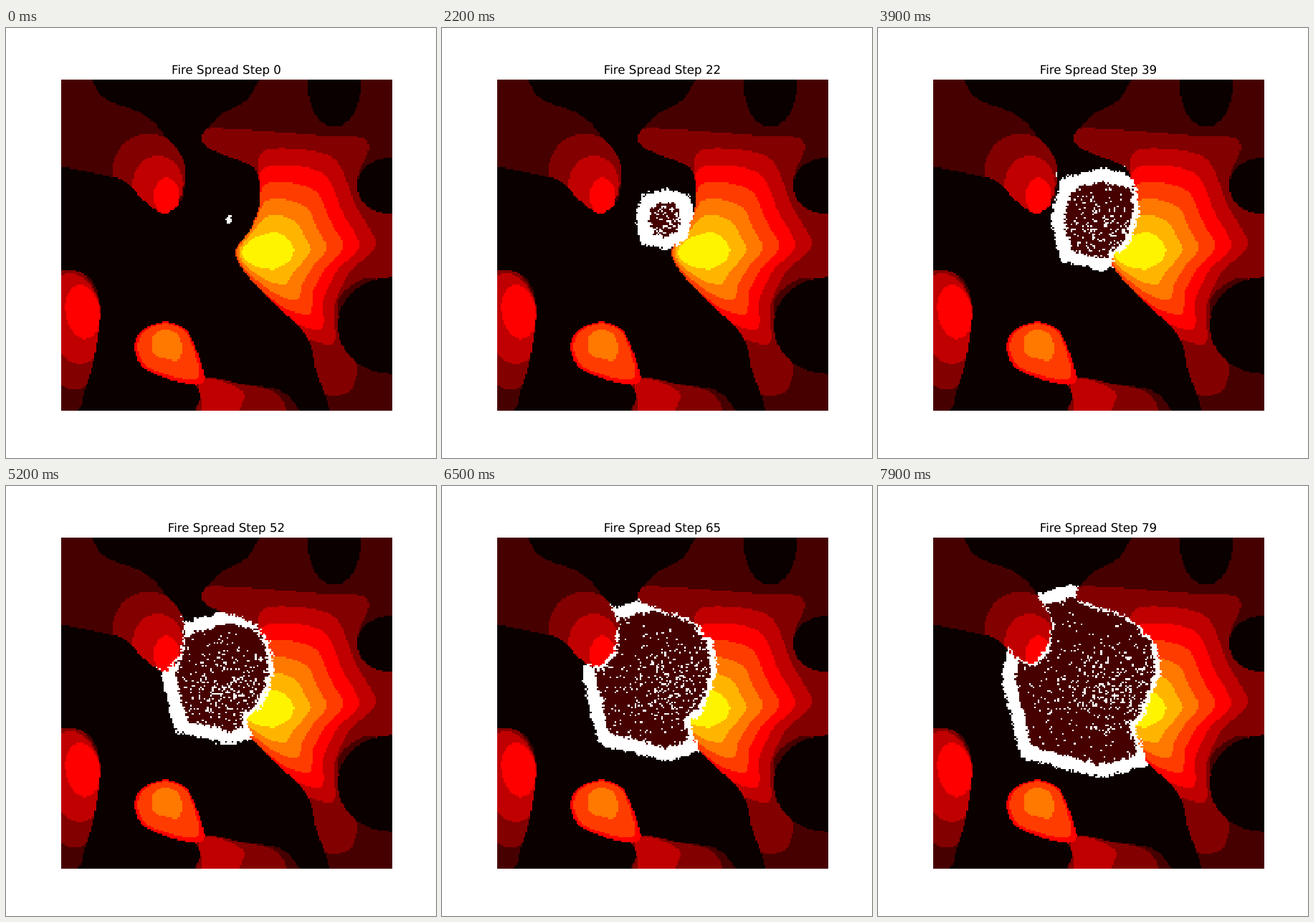
Recreate the animation shown at these times as an HTML page with a canvas. Size 600x600 px, loop 8 s.

```html
<!DOCTYPE html>
<html lang="en">
<head>
<meta charset="utf-8">
<title>Fire Spread</title>
<style>
  html, body { margin: 0; width: 100%; height: 100%; overflow: hidden; background: #fff; }
  canvas { position: absolute; left: 77px; top: 72px; width: 462px; height: 462px; image-rendering: pixelated; }
  svg { position: absolute; left: 0; top: 0; }
  text { font: 16.667px "DejaVu Sans", sans-serif; text-rendering: geometricPrecision; }
</style>
</head>
<body>
<canvas id="map" width="200" height="200"></canvas>
<svg width="600" height="600"><text id="title" x="307.5" y="64" text-anchor="middle"></text></svg>
<script>
const N = 200, SIZE = 462, LEFT = 77, TOP = 72;
const STEPS = 80, STEP_MS = 100, BURN_STEPS = 11;
const COLORS = [[10, 0, 0], [71, 0, 0], [131, 0, 0], [192, 0, 0], [255, 0, 0],
  [255, 60, 0], [255, 120, 0], [255, 181, 0], [255, 244, 0]];
const WHITE = [255, 255, 255], BURNT = COLORS[1];
// Cells per step the fire advances on each fuel level.
const SPEED = [.74, .12, .12, .13, .18, .3, .33, .3, .28];
const DIAGONAL = 1.25;

const level = new Uint8Array(N * N).fill(1);
const scratch = document.createElement('canvas');
scratch.width = scratch.height = N;
const pen = scratch.getContext('2d', { willReadFrequently: true });

// Sets the fuel level of every cell inside a shape given in stage coordinates.
function fill(value, trace, shape) {
  pen.setTransform(1, 0, 0, 1, 0, 0);
  pen.clearRect(0, 0, N, N);
  pen.scale(N / SIZE, N / SIZE);
  pen.translate(-LEFT, -TOP);
  pen.beginPath();
  trace(shape);
  pen.fill();
  const data = pen.getImageData(0, 0, N, N).data;
  for (let i = 0; i < N * N; i++) if (data[4 * i + 3] > 127) level[i] = value;
}

const ellipse = ([x, y, rx, ry, tilt = 0]) => pen.ellipse(x, y, rx, ry, tilt, 0, 2 * Math.PI);

// Closed smooth curve through x, y pairs.
function curve(xy) {
  const n = xy.length / 2;
  const at = i => [xy[2 * ((i + n) % n)], xy[2 * ((i + n) % n) + 1]];
  pen.moveTo(...at(0));
  for (let i = 0; i < n; i++) {
    const [a, b, c, d] = [at(i - 1), at(i), at(i + 1), at(i + 2)];
    pen.bezierCurveTo(b[0] + (c[0] - a[0]) / 7, b[1] + (c[1] - a[1]) / 7,
      c[0] - (d[0] - b[0]) / 7, c[1] - (d[1] - b[1]) / 7, c[0], c[1]);
  }
}

// Stacks fuel levels whose outlines shrink from the outer shape to the inner one.
function hill(low, high, trace, outer, inner, ease = 1) {
  for (let v = low; v <= high; v++) {
    const f = ((v - low) / (high - low)) ** ease;
    fill(v, trace, outer.map((o, i) => o + (inner[i] - o) * f));
  }
}

// Large hill on the right: skirt, then nested slopes
fill(2, curve, [265, 155, 278, 141, 350, 143, 455, 151, 498, 153, 506, 170, 494, 197, 490, 225, 510, 254, 550, 262,
  550, 348, 500, 350, 468, 372, 463, 395, 471, 427, 490, 472, 482, 504, 460, 514, 438, 505, 431, 475, 400, 450, 300, 300]);
hill(3, 8, curve,
  [312, 310, 352, 245, 355, 176, 405, 169, 460, 184, 488, 248, 516, 302, 478, 343, 458, 390, 457, 440, 405, 425, 335, 360],
  [329, 312, 341, 296, 366, 286, 382, 286, 394, 296, 399, 302, 402, 311, 396, 325, 385, 332, 373, 337, 357, 335, 337, 326]);
// Hills on the left
hill(2, 4, ellipse, [200, 200, 52, 53], [224, 235, 18, 26]);
hill(2, 4, ellipse, [86, 415, 52, 90, -.17], [107, 396, 24, 38, -.17]);
// Bare ground cuts into the hills
fill(0, curve, [121, 30, 124, 80, 142, 101, 185, 117, 208, 133, 223, 152, 239, 169, 249, 190, 247, 235, 222, 260,
  192, 240, 166, 214, 140, 206, 77, 194, 30, 190, 30, 337, 90, 337, 120, 352, 132, 395, 122, 465, 107, 520, 107, 580,
  432, 580, 431, 470, 415, 424, 370, 381, 333, 340, 320, 311, 340, 282, 354, 245, 352, 208, 340, 191, 283, 168,
  274, 149, 300, 121, 342, 93, 347, 30]);
fill(0, ellipse, [458, 80, 37, 58]);
fill(0, ellipse, [535, 220, 45, 39]);
fill(0, ellipse, [535, 415, 72, 67]);
// Small drop and the strip below it
hill(1, 3, curve, [266, 496, 284, 487, 330, 497, 375, 503, 400, 520, 410, 560, 265, 560, 271, 515],
  [268, 498, 282, 489, 312, 497, 331, 508, 331, 520, 310, 560, 280, 560, 272, 515], 2.3);
hill(4, 6, curve, [179, 446, 190, 422, 222, 410, 252, 422, 268, 455, 277, 488, 268, 498, 230, 491, 192, 474],
  [203, 443, 207, 428, 222, 421, 240, 428, 246, 447, 242, 462, 236, 464, 222, 461, 207, 456], 2.3);

function random(x, y, seed) {
  let h = Math.imul(x + 11, 374761393) ^ Math.imul(y + 7, 668265263) ^ Math.imul(seed + 3, 1274126177);
  h = Math.imul(h ^ (h >>> 13), 1103515245);
  h = Math.imul(h ^ (h >>> 15), 2246822519);
  return ((h ^ (h >>> 16)) >>> 0) / 4294967296;
}

// Step at which the front reaches each cell: shortest travel time from the seed.
const arrival = new Float32Array(N * N).fill(Infinity);
const queue = [];
['..##', '.##.', '####', '.###', '.##.'].forEach((row, j) => [...row].forEach((c, i) => {
  if (c !== '#') return;
  const k = (82 + j) * N + 99 + i;
  arrival[k] = 0;
  queue.push(k);
}));
for (let q = 0; q < queue.length; q++) {
  const k = queue[q], x = k % N, y = (k - x) / N;
  for (let v = Math.max(0, y - 1); v <= Math.min(N - 1, y + 1); v++) {
    for (let u = Math.max(0, x - 1); u <= Math.min(N - 1, x + 1); u++) {
      const m = v * N + u, dist = u !== x && v !== y ? DIAGONAL : 1;
      const t = arrival[k] + dist * (1 / SPEED[level[k]] + 1 / SPEED[level[m]]) / 2;
      if (t < 100 && t < arrival[m] - 1e-3) {
        arrival[m] = t;
        queue.push(m);
      }
    }
  }
}

// Ragged front, and the chance of a burnt cell flaring up again.
const flare = new Float32Array(N * N);
for (let k = 0; k < N * N; k++) {
  const x = k % N, y = (k - x) / N;
  if (arrival[k] > 0) {
    const noise = random(x, y, 1) - .5 + .8 * (random(x >> 2, y >> 2, 2) - .5);
    arrival[k] = Math.max(.5, arrival[k] + noise * Math.min(1.8 / SPEED[level[k]], 15));
  }
  const near = Math.exp(-((x - 109) ** 2 + 2.5 * (y - 92) ** 2) / 1400);
  flare[k] = (.012 + .16 * near) * 3 * random(x >> 1, y >> 1, 4) ** 2;
}

const map = document.getElementById('map').getContext('2d');
const title = document.getElementById('title');
const image = map.createImageData(N, N);

function cellColor(k, step) {
  const age = step - arrival[k];
  if (age < 0) return COLORS[level[k]];
  if (age < BURN_STEPS) return WHITE;
  const x = k % N, y = (k - x) / N;
  const spell = Math.floor(step / BURN_STEPS + random(x, y, 5));
  return random(x, y, 20 + spell) < flare[k] ? WHITE : BURNT;
}

function draw(step) {
  for (let k = 0; k < N * N; k++) image.data.set([...cellColor(k, step), 255], 4 * k);
  map.putImageData(image, 0, 0);
  title.textContent = 'Fire Spread Step ' + step;
}

let start, shown = 0;
function tick(now) {
  start ??= now;
  const step = Math.floor((now - start) / STEP_MS) % STEPS;
  if (step !== shown) draw(shown = step);
  requestAnimationFrame(tick);
}
draw(0);
requestAnimationFrame(tick);
</script>
</body>
</html>
```
